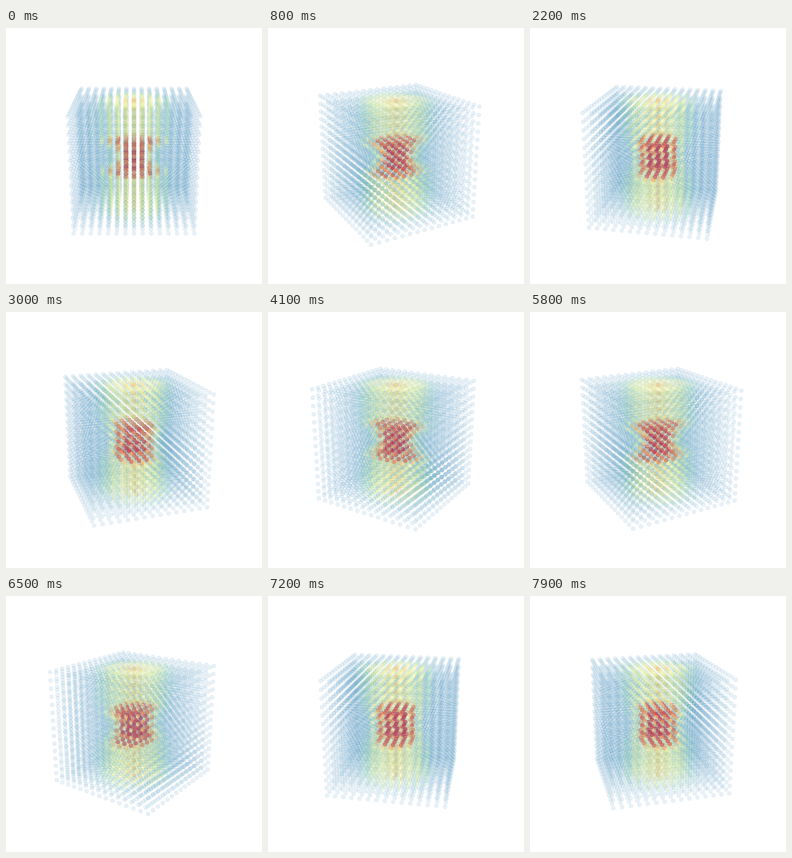
These frames come from a looping animation (256x256 px, 8 s). A matplotlib script:

```python
import numpy as np
import matplotlib.pyplot as plt
from matplotlib.animation import FuncAnimation

SIZE, DPI = 256, 100
FRAMES, INTERVAL = 80, 100
STEP = np.radians(3.6)      # turn per frame
ELEV = np.radians(20)
DIST = 4.25                 # eye distance, in cube sides
FOCAL = SIZE / 2 / np.tan(np.radians(15))
N = 15                      # points per side
DOT = 4.1                   # diameter in pixels


def field(x, y, z):
    """Hourglass core, flared along x, on a column along z; in grid steps."""
    r = np.hypot(x, y)
    width = 4 - np.exp(-(z / 2) ** 2)
    column = (0.1 + 0.42 * np.exp(-(r / width) ** 4)
              + 0.13 * np.exp(-r ** 2 / 1.5))
    flare = np.minimum(2.1 + 0.45 * z ** 2, 5)
    rho = np.hypot(x / flare, y / 3)
    core = 0.92 / (1 + rho ** 6) / (1 + (z / 2.8) ** 8)
    return np.maximum(column, core)


def project(angle):
    """Screen position and depth towards the eye of every point."""
    c, s = np.cos(angle), np.sin(angle)
    side = X * c + Y * s
    near = Y * c - X * s
    depth = near * np.cos(ELEV) + Z * np.sin(ELEV)
    up = Z * np.cos(ELEV) - near * np.sin(ELEV)
    scale = FOCAL / (DIST - depth)
    return np.column_stack([side * scale, up * scale]), depth


steps = np.arange(N) - (N - 1) / 2
grid = np.array(np.meshgrid(steps, steps, steps)).reshape(3, -1)
X, Y, Z = grid / (N - 1)

value = field(*grid)
face = plt.get_cmap("Spectral_r")(value)
face[:, 3] = 0.03 + 0.85 * value
edge = face.copy()
edge[:, :3] *= 0.92
edge[:, 3] *= 0.5

fig = plt.figure(figsize=(SIZE / DPI, SIZE / DPI), dpi=DPI, facecolor="white")
ax = fig.add_axes([0, 0, 1, 1])
ax.set(xlim=(-SIZE / 2, SIZE / 2), ylim=(-SIZE / 2, SIZE / 2))
ax.axis("off")
dots = ax.scatter(X, Y, s=(DOT * 72 / DPI) ** 2, linewidths=0.4)


def update(i):
    pos, depth = project(i * STEP)
    order = np.argsort(depth, kind="stable")
    dots.set_offsets(pos[order])
    dots.set_facecolors(face[order])
    dots.set_edgecolors(edge[order])
    return (dots,)


anim = FuncAnimation(fig, update, frames=FRAMES, interval=INTERVAL,
                     repeat=True, repeat_delay=0)
plt.show()
```
